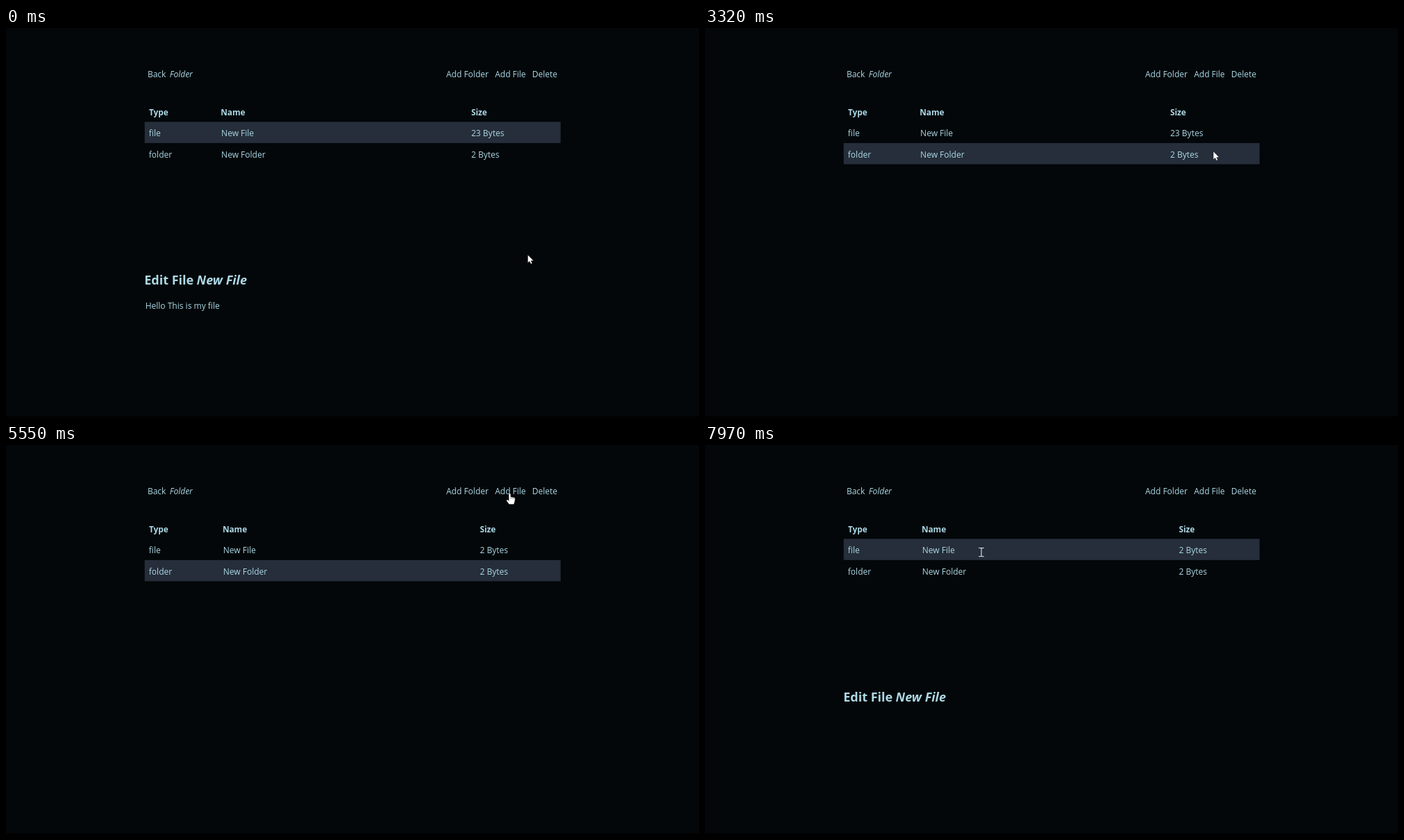
An HTML page for the animation above (8 s loop, 998x561 px).

```html
<!DOCTYPE html>
<html lang="en">
<head>
<meta charset="utf-8">
<title>File browser</title>
<style>
  html, body { margin: 0; width: 100%; height: 100%; overflow: hidden; background: #030709; }
  svg { display: block; width: 998px; height: 561px; }
  text { font: 12px "Open Sans", "Noto Sans", sans-serif; fill: #add8e6; white-space: pre; }
  .bold { font-weight: 700; font-size: 11.8px; }
  .italic { font-style: italic; }
  .title { font-weight: 700; font-size: 18px; }
  #cursor path { stroke-linejoin: round; stroke-linecap: round; }
</style>
</head>
<body>
<svg viewBox="0 0 998 561">
  <rect width="998" height="561" fill="#030709"/>
  <rect y="560" width="998" height="1" fill="#000"/>
  <rect id="selection" x="199.7" width="599" height="30.6" fill="#252e3a"/>

  <text x="203.9" y="70.8">Back</text>
  <text x="235.8" y="70.8" class="italic">Folder</text>
  <text x="634" y="70.8">Add Folder</text>
  <text x="704.2" y="70.8">Add File</text>
  <text x="757.8" y="70.8">Delete</text>

  <g>
    <text x="206" y="125.8" class="bold">Type</text>
    <text x="205.8" y="156.2">file</text>
    <text x="205.8" y="186.8">folder</text>
  </g>
  <g id="names">
    <text x="309.2" y="125.8" class="bold">Name</text>
    <text x="310.1" y="156.2">New File</text>
    <text x="310.1" y="186.8">New Folder</text>
  </g>
  <g id="sizes">
    <text x="670" y="125.8" class="bold">Size</text>
    <text x="670" y="156.2" id="fileSize"></text>
    <text x="670" y="186.8">2 Bytes</text>
  </g>

  <g id="editor">
    <text x="199.2" y="369.6" class="title">Edit File</text>
    <text x="274.6" y="369.6" class="title italic">New File</text>
    <text x="200.7" y="405.2" id="content">Hello This is my file</text>
  </g>

  <g id="cursor">
    <path id="arrow" d="M.4 .2V11.8L3 9.4L4.8 13.3L6.8 12.4L5.1 8.7H8.8Z" fill="#fff" stroke="#000" stroke-width=".4"/>
    <g id="hand">
      <path d="M-1.4 .9Q-1.2-.2 0-.2T1.4 .9V4.6L6 5.5Q7.9 6 7.8 7.8L7.2 11.7L6 15.5H-.8L-4.5 10.7Q-5.1 9.3-3.8 8.8Q-2.9 8.6-1.4 10.1Z" fill="#fff" stroke="#000" stroke-width=".4"/>
      <path d="M1.5 5V7.6M3.7 5.4V7.8M5.8 5.9V8" fill="none" stroke="#444" stroke-width=".5"/>
    </g>
    <path id="beam" d="M-3.4-6H-1L0-5.3L1-6H3.4M0-5.3V5.6M-3.4 6.3H-1L0 5.6L1 6.3H3.4" fill="none" stroke="#e8eaec" stroke-width="1.1"/>
  </g>
</svg>
<script>
const LOOP = 8000;
const SELECT_FOLDER = 1990, ADD_FILE = 5060, SELECT_FILE = 7100;

// Pointer hot spot: time, x, y
const track = [
  [1090, 751, 327], [1300, 741, 303], [1470, 734.5, 272], [1660, 733.5, 225], [1800, 734, 195], [1890, 734, 188],
  [2680, 734, 188], [3030, 734.4, 183],
  [3290, 734.4, 183], [3430, 722, 160], [3580, 690, 119], [3710, 667, 86], [3830, 663, 68.5],
  [4490, 663, 68.5], [4580, 674, 66], [4720, 708, 64], [4860, 725.5, 64],
  [5410, 725.5, 64], [5550, 725.5, 70], [5680, 716, 86], [5800, 706, 95],
  [5960, 706, 95], [6120, 694, 108], [6360, 650, 139], [6560, 570, 155], [6680, 528, 159], [6760, 514, 159],
  [6780, 514, 159], [6970, 505, 160],
  [7200, 505, 160], [7400, 487, 159.5], [7610, 462, 159],
  [7720, 436, 157], [7860, 407, 154.5], [7970, 398, 154.5]
];
const links = [[634, 695], [704, 749], [758, 795]];
const $ = id => document.getElementById(id);
const show = (id, on) => $(id).setAttribute("visibility", on ? "visible" : "hidden");
const shift = (id, x, y = 0) => $(id).setAttribute("transform", `translate(${x} ${y})`);

function pointerAt(t) {
  const next = track.findIndex(key => key[0] > t);
  if (next < 1) return (next ? track.at(-1) : track[0]).slice(1);
  const [t0, x0, y0] = track[next - 1], [t1, x1, y1] = track[next];
  const k = (t - t0) / (t1 - t0);
  return [x0 + (x1 - x0) * k, y0 + (y1 - y0) * k];
}

function pointerShape(x, y) {
  if (y < 77 && links.some(([left, right]) => x >= left && x <= right)) return "hand";
  return x < 470 && y < 158.5 ? "beam" : "arrow";
}

function render(t) {
  const fileSelected = t < SELECT_FOLDER || t >= SELECT_FILE;
  const added = t >= ADD_FILE;
  $("selection").setAttribute("y", fileSelected ? 135.3 : 165.9);
  show("editor", fileSelected);
  show("content", t < SELECT_FOLDER);
  $("fileSize").textContent = added ? "2 Bytes" : "23 Bytes";
  shift("names", added ? 2.7 : 0);
  shift("sizes", added ? 12.4 : 0);

  const [x, y] = pointerAt(t), shape = pointerShape(x, y);
  shift("cursor", x, y);
  for (const id of ["arrow", "hand", "beam"]) show(id, id === shape);
}

const start = performance.now();
function tick() {
  render((performance.now() - start) % LOOP);
  requestAnimationFrame(tick);
}
tick();
</script>
</body>
</html>
```
